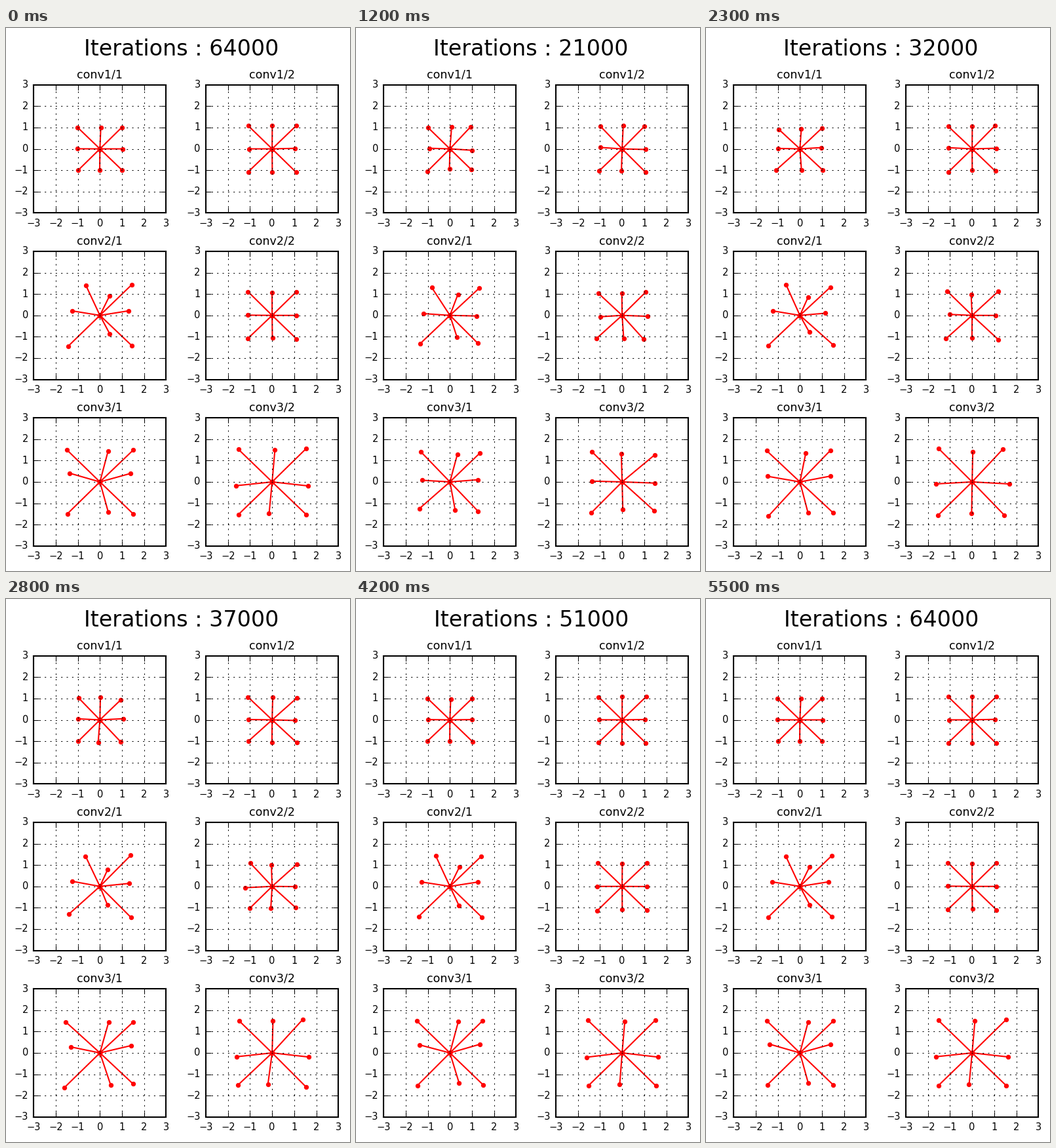
A matplotlib script that plays this animation: 525 by 829 pixels, repeating every 5600 ms.

```python
import numpy as np
import matplotlib.pyplot as plt
from matplotlib.animation import FuncAnimation

plt.style.use("classic")
plt.rcParams.update({
    "font.family": "DejaVu Sans",
    "font.size": 7,
    "figure.facecolor": "white",
    "savefig.facecolor": "white",
    "savefig.dpi": "figure",
})

W, H, DPI = 525, 829, 150
FRAMES, STEP_MS = 56, 100

# Panel layout in pixels, measured from the top left.
LEFT, TOP = 42.25, 86.74
BOX_W, BOX_H, GAP = 202.17, 195.56, 0.3

# Settled shape of each star: reach of the corner, side and upright arms,
# then the sideways lean and twist of the uprights, the rise of the sides
# and how far the top left corner is tucked in.
SHAPES = {
    "conv1/1": (1.00, 1.01, 0.99, 0.02, 0.02, 0.01, 0),
    "conv1/2": (1.08, 1.04, 1.07, 0, 0, 0.01, 0),
    "conv2/1": (1.43, 1.28, 0.89, 0.43, 0, 0.21, 0.78),
    "conv2/2": (1.11, 1.11, 1.06, 0, 0, 0, 0),
    "conv3/1": (1.50, 1.37, 1.43, 0.39, 0, 0.40, 0),
    "conv3/2": (1.54, 1.63, 1.49, 0, 0.13, -0.19, 0),
}
NOISE = (0.04, 0.06, 0.07)      # per row of panels

# Thousands of iterations: growth starts, steps get smaller, training ends.
START, CALM, LAST = 14, 41, 64

# The eight neighbours of the centre.
GX, GY = np.array([(x, y) for y in (1, 0, -1) for x in (-1, 0, 1)
                   if (x, y) != (0, 0)]).T
UPRIGHT, SIDE = GX == 0, GY == 0
TOP_LEFT = (GX < 0) & (GY > 0)


def growth(k):
    """Ease out from half of the settled stretch to all of it."""
    left = max(0, (CALM - k) / (CALM - START))
    return 1 - 0.5 * left ** 1.7


def star(shape, k):
    """Smooth arm tips of one panel after k thousand iterations."""
    corner, side, up, lean, twist, rise, tuck = shape
    g = growth(k)
    late = max(0, 2 * g - 1) ** 2
    reach = np.select([UPRIGHT, SIDE], [up, side], corner)
    reach = 1 + g * (reach - 1)
    x = GX * reach + UPRIGHT * (g * lean + late * twist * GY)
    y = GY * reach + SIDE * late * rise
    return np.array([x + TOP_LEFT * g * tuck, y])


def make_panel(n, name):
    row, col = divmod(n, 2)
    x = LEFT + col * BOX_W * (1 + GAP)
    y = H - TOP - BOX_H - row * BOX_H * (1 + GAP)
    ax = fig.add_axes([x / W, y / H, BOX_W / W, BOX_H / H])
    ax.set(xlim=(-3, 3), ylim=(-3, 3),
           xticks=range(-3, 4), yticks=range(-3, 4))
    ax.set_title(name)
    ax.grid(True)
    return ax.plot([], [], "r.-", lw=1, ms=6)[0]


def spokes(values):
    """Centre, tip, gap for every arm."""
    out = np.zeros((len(values), 3))
    out[:, 1] = values
    out[:, 2] = np.nan
    return out.ravel()


fig = plt.figure(figsize=(W / DPI, H / DPI), dpi=DPI)
heading = fig.suptitle("", x=267.25 / W, y=1 - 16.4 / H, fontsize=16)
arms = [make_panel(n, name) for n, name in enumerate(SHAPES)]


def draw(frame):
    k = 9 + frame if frame else LAST
    heading.set_text(f"Iterations : {k * 1000}")
    rng = np.random.default_rng(k)
    calm = 1 if k < CALM else 0.2
    for n, (line, shape) in enumerate(zip(arms, SHAPES.values())):
        jitter = rng.normal(size=(2, len(GX))).clip(-2, 2)
        x, y = star(shape, k) + calm * NOISE[n // 2] * jitter
        line.set_data(spokes(x), spokes(y))
    return [heading, *arms]


anim = FuncAnimation(fig, draw, frames=FRAMES, interval=STEP_MS,
                     init_func=lambda: draw(0), repeat=True, repeat_delay=0)
plt.show()
```
